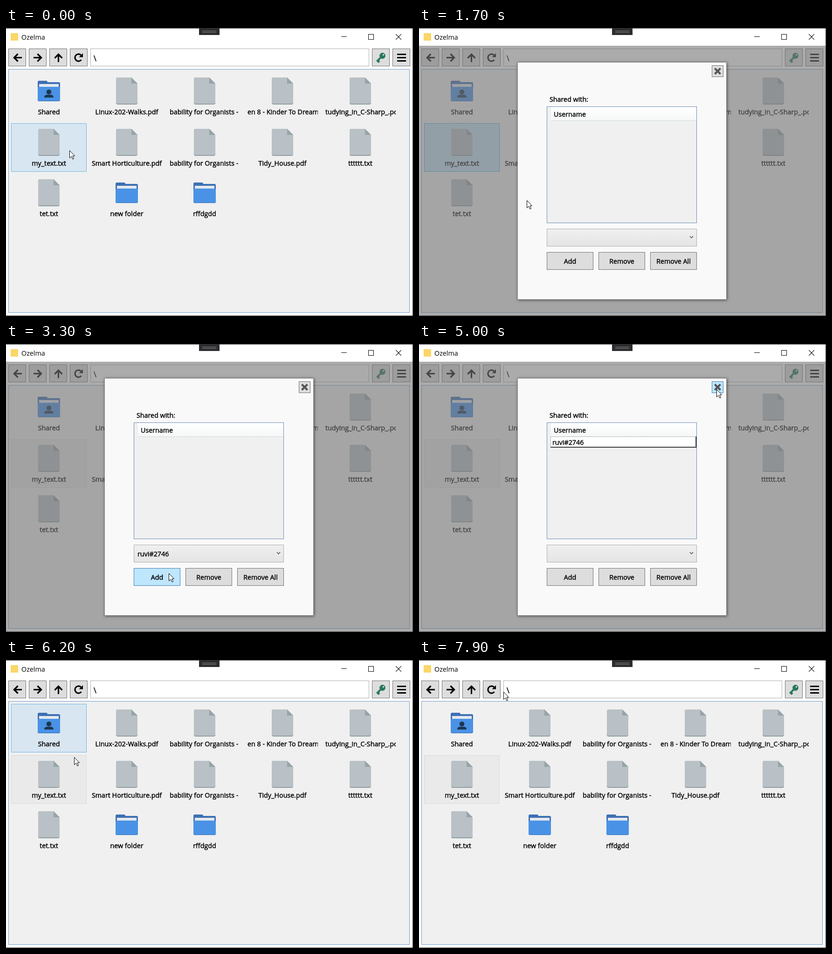
An HTML page with a canvas for the animation above (8000 ms loop, 873x617 px).

```html
<!DOCTYPE html>
<html lang="en">
<head>
<meta charset="utf-8">
<style>
html, body { margin: 0; width: 100%; height: 100%; overflow: hidden; background: #fff; }
canvas { display: block; }
</style>
</head>
<body>
<canvas id="stage" width="873" height="617"></canvas>
<script>
const c = document.getElementById('stage').getContext('2d');
const LOOP = 8000, STEP = 100, HOVER_LAG = 150, TAU = Math.PI * 2;
const MENU_OPEN = 600, DIALOG_OPEN = 1500, DROP_OPEN = 2500, PICKED = 2900, ADDED = 3500, CLOSED = 5300;
const USER = 'ruvi#2746';

// Pointer stops: time, x, y
const STOPS = [[0, 136, 262], [MENU_OPEN, 132, 261], [1200, 212, 351], [DIALOG_OPEN, 212, 353], [2200, 306, 435],
  [2800, 318, 482], [3300, 349, 491], [3700, 349, 491], [5000, 638, 97], [CLOSED, 638, 97],
  [5900, 143, 150], [6200, 146, 208], [7200, 156, 236], [7900, 181, 68]];

const ROWS = [135, 245, 353];
const FILES = [
  ['Shared', 'Linux-202-Walks.pdf', 'bability for Organists - 3', 'en 8 - Kinder To Dreams', 'tudying_in_C-Sharp_.pdf'],
  ['my_text.txt', 'Smart Horticulture.pdf', 'bability for Organists - 3', 'Tidy_House.pdf', 'tttttt.txt'],
  ['tet.txt', 'new folder', 'rffdgdd']];
const FOLDERS = ['Shared', 'new folder', 'rffdgdd'];

function pointerAt(t) {
  const i = Math.max(1, STOPS.findIndex(s => s[0] >= t));
  const [a, b] = [STOPS[i - 1], STOPS[i]];
  const k = Math.max(0, (t - a[0]) / (b[0] - a[0])), ease = k * k * (3 - 2 * k);
  return [a[1] + (b[1] - a[1]) * ease, a[2] + (b[2] - a[2]) * ease];
}

const over = ([px, py], x, y, w, h) => px >= x && px < x + w && py >= y && py < y + h;

function rect(x, y, w, h, fill, border) {
  c.fillStyle = fill;
  c.fillRect(x, y, w, h);
  if (border) {
    c.strokeStyle = border;
    c.lineWidth = 1;
    c.strokeRect(x + .5, y + .5, w - 1, h - 1);
  }
}

// "heavy" thickens regular glyphs to a medium weight.
function text(s, x, y, { align = 'left', heavy = true, size = 14.3 } = {}) {
  c.font = `${size}px "Open Sans", "Noto Sans", sans-serif`;
  c.textAlign = align;
  c.fillStyle = c.strokeStyle = '#000';
  c.fillText(s, x, y);
  c.lineWidth = .45;
  if (heavy) c.strokeText(s, x, y);
}

function trace(points) {
  c.beginPath();
  points.forEach(p => c.lineTo(...p));
}

function line(points, width, color = '#000') {
  trace(points);
  c.lineWidth = width;
  c.strokeStyle = color;
  c.stroke();
}

function shape(points, fill = '#000') {
  trace(points);
  c.fillStyle = fill;
  c.fill();
}

function dot(x, y, r, fill = '#000') {
  c.beginPath();
  c.arc(x, y, r, 0, TAU);
  c.fillStyle = fill;
  c.fill();
}

function arc(x, y, r, from, to, width) {
  c.beginPath();
  c.arc(x, y, r, from, to);
  c.lineWidth = width;
  c.strokeStyle = '#000';
  c.stroke();
}

function round(x, y, w, h, r, fill) {
  c.beginPath();
  c.roundRect(x, y, w, h, r);
  c.fillStyle = fill;
  c.fill();
}

function at(x, y, angle, draw) {
  c.save();
  c.translate(x, y);
  c.rotate(angle);
  draw();
  c.restore();
}

function clipTo(build, draw) {
  c.save();
  build();
  c.clip();
  draw();
  c.restore();
}

function cross(x, y, r, width, color) {
  for (const s of [-1, 1]) line([[x - r, y - s * r], [x + r, y + s * r]], width, color);
}

function gradient(y, h, top, bottom) {
  const g = c.createLinearGradient(0, y, 0, y + h);
  g.addColorStop(0, top);
  g.addColorStop(1, bottom);
  return g;
}

function panel(x, y, w, h, fill, border, blur, offset) {
  c.save();
  c.shadowColor = 'rgba(0,0,0,.55)';
  c.shadowBlur = blur;
  c.shadowOffsetX = c.shadowOffsetY = offset;
  rect(x, y, w, h, fill);
  c.restore();
  rect(x, y, w, h, fill, border);
}

function titleBar() {
  rect(0, 0, 873, 38, '#fff');
  rect(0, 0, 873, 1, '#1d1d1d');
  rect(872, 0, 1, 617, '#333');
  rect(0, 616, 873, 1, '#333');
  rect(10, 11, 16, 16, '#fbd668');
  text('Ozelma', 33, 25, { heavy: false });
  rect(414, 0, 44, 15, '#2d2d30');
  for (const y of [6, 9]) rect(421, y, 30, 1, '#858585');
  rect(719, 18, 12, 1, '#000');
  rect(777, 13, 12, 12, '#fff', '#000');
  cross(842, 19, 5.8, 1.1);
}

function toolbar() {
  for (let i = 0; i < 6; i++) rect(i < 4 ? 5 + 44 * i : 609 + 44 * i, 44, 38, 38, '#ddd', '#707070');
  rect(181, 44, 598, 38, '#fff', '#abadb3');
  text('\\', 188, 71, { size: 16 });
  [0, Math.PI, Math.PI / 2].forEach((angle, i) => at(24.5 + 44 * i, 63.5, angle, () => {
    line([[-7, 0], [9.5, 0]], 3.2);
    line([[1, -8], [-7, 0], [1, 8]], 3.4);
  }));
  arc(155.5, 63.5, 7.6, .65, 5.5, 3.2);
  shape([[165, 54], [165, 62.5], [156.5, 62.5]]);
  at(807.5, 59.5, -Math.PI / 4, () => {
    rect(-17, -2, 14, 4, '#27795c');
    rect(-17, 0, 5, 5, '#27795c');
    dot(0, 0, 6.4, '#27795c');
    dot(2.8, 0, 1.7, '#ddd');
  });
  for (let i = 0; i < 3; i++) rect(839, 55 + 7 * i, 19, 3, '#000');
}

function fileIcon(x, y) {
  const [l, t, r, b, fold] = [x - 23, y - 29, x + 23, y + 29, 13];
  clipTo(() => trace([[l, t], [r - fold, t], [r, t + fold], [r, b], [l, b]]), () => {
    round(l, t, 46, 58, 4, '#919fa2');
    round(l, t, 46, 56, 4, '#b9c1c6');
    shape([[r - fold, t], [r, t + fold], [r - fold, t + fold]], '#96a5a7');
  });
}

function folderIcon(x, y, shared) {
  round(x - 24, y - 22, 21, 12, 3, '#3e70b4');
  round(x - 24, y - 19, 48, 38, 3, '#3e70b4');
  rect(x - 21, y - 15, 42, 8, '#e3e8ee');
  round(x - 24, y - 9, 48, 31, 3, '#3b74bc');
  round(x - 24, y - 9, 48, 30, 3, '#4a92e6');
  if (!shared) return;
  dot(x, y + 2, 5.3, '#1c3850');
  round(x - 10, y + 8, 20, 6, [6, 6, 1, 1], '#1c3850');
}

function fileList(t, hover) {
  rect(5, 88, 861, 522, '#f0f0f0', '#6c9bcb');
  const modal = t >= DIALOG_OPEN && t < CLOSED, blocked = t >= MENU_OPEN && t < CLOSED;
  FILES.forEach((names, r) => names.forEach((name, i) => {
    const x = 92 + 167 * i, y = ROWS[r], box = [x - 81, y - 41, 162, 104];
    const selected = name === 'my_text.txt' && t >= MENU_OPEN;
    if (selected && modal && t < DROP_OPEN) rect(...box, '#c5e2f3', '#4ca8e4');
    else if (selected) rect(...box, '#e9eae9', '#dadada');
    else if (!blocked && over(hover, ...box)) rect(...box, '#d8e6f1', '#70b6e2');
    if (FOLDERS.includes(name)) folderIcon(x, y, name === 'Shared');
    else fileIcon(x, y);
    clipTo(() => { c.beginPath(); c.rect(x - 75, y + 32, 151, 28); }, () => {
      const clipped = /^(bab|en 8|tud)/.test(name);
      text(name, clipped ? x - 75 : x, y + 50, { align: clipped ? 'left' : 'center' });
    });
  }));
}

const MENU = {
  Open() {
    shape([[-10, -3], [0, -10], [10, -3], [10, 9], [-10, 9]]);
    rect(-6, -5, 12, 7, '#f2f2f2');
    for (const y of [-3, 0]) rect(-4, y, 8, 1.5, '#000');
    line([[-9, 1], [0, 6], [9, 1]], 1.5, '#f2f2f2');
  },
  Update() {
    for (const angle of [0, Math.PI]) at(0, 0, angle, () => {
      arc(0, 0, 7.5, 3.4, 5.7, 3);
      shape([[10, -10], [10, -2], [2, -2]]);
    });
  },
  Export() {
    shape([[-10, -9], [0, -9], [5, -4], [5, 9], [-10, 9]]);
    line([[0, -9], [0, -4], [5, -4]], 1, '#f2f2f2');
    line([[-3, 2], [5, 2]], 2, '#f2f2f2');
    line([[5, 2], [9, 2]], 2.4);
    shape([[6, -2.5], [10.5, 2], [6, 6.5]]);
  },
  Share() {
    const nodes = [[6, -6], [-5, 0], [6, 6]];
    line(nodes, 2.4);
    nodes.forEach(p => dot(...p, 3.8));
  },
  Delete() {
    round(-10, -9, 20, 18, 2, '#cd7468');
    cross(0, 0, 4, 3, '#fff');
  }
};

function contextMenu(tip) {
  panel(132, 260, 165, 147, '#f3f3f3', '#999', 4, 3);
  rect(170, 263, 1, 141, '#dcdcdc');
  Object.entries(MENU).forEach(([label, icon], i) => {
    const y = 263 + 28 * i;
    if (over(tip, 136, y, 156, 28)) rect(136, y, 156, 28, '#bfddee', '#3b9cda');
    at(150, y + 14.5, 0, icon);
    text(label, 180, y + 20, { heavy: false });
  });
}

function button(tip, label, x, y, w, h) {
  const hot = over(tip, x, y, w, h);
  rect(x, y, w, h, hot ? '#bee6fd' : '#ddd', hot ? '#3c7fb1' : '#707070');
  text(label, x + w / 2, y + 25, { align: 'center' });
}

function dialog(t, tip) {
  rect(0, 38, 872, 578, 'rgba(115,115,115,.6)');
  panel(211, 73, 449, 509, '#faf9fa', '#8d8a8c', 6, 1);
  button(tip, '', 628, 80, 25, 25);
  cross(640.5, 92.5, 6, 4.2, '#555');
  text('Shared with:', 280, 158);
  rect(274, 168, 322, 250, '#f0f0f0', '#688caf');
  rect(283, 169, 312, 29, gradient(169, 29, '#fff', '#f5f7f8'));
  rect(283, 198, 312, 1, '#d0dbe0');
  text('Username', 289, 190);
  if (t >= ADDED) {
    rect(282, 198, 313, 24, '#000');
    rect(282, 198, 311.5, 22.5, '#fff', '#b5b5b5');
    text(USER, 286, 216);
  }

  const dropped = t >= DROP_OPEN && t < PICKED;
  const hot = dropped || over(tip, 274, 430, 322, 38);
  rect(274, 430, 322, 38, gradient(430, 38, ...(hot ? ['#ebf4fc', '#dcebfb'] : ['#f0f0f0', '#e4e4e4'])),
    hot ? '#7eb4e2' : '#acacac');
  line([[581, 446], [584.5, 449.5], [588, 446]], 1.6, hot ? '#000' : '#555');
  if (t >= PICKED && t < ADDED) text(USER, 282, 455);
  ['Add', 'Remove', 'Remove All'].forEach((label, i) => button(tip, label, 274 + 111 * i, 480, 100, 38));
  if (dropped) {
    rect(274, 468, 322, 28, '#fff', '#7a7a7a');
    if (over(tip, 275, 468, 320, 28)) rect(275, 469, 320, 26, '#d5e9f8', '#78bce8');
    text(USER, 282, 487);
  }
}

function cursor(x, y) {
  at(Math.round(x) + .5, Math.round(y) + .5, 0, () => {
    shape([[0, 0], [0, 16], [4, 12.5], [6.5, 18.5], [9, 17.5], [6.5, 11.5], [11, 11.5]], '#fff');
    c.closePath();
    c.lineWidth = 1;
    c.strokeStyle = '#000';
    c.stroke();
  });
}

function frame(now) {
  const t = Math.floor(now % LOOP / STEP) * STEP, tip = pointerAt(t);
  rect(0, 0, 873, 617, '#fff');
  toolbar();
  fileList(t, pointerAt(Math.max(0, t - HOVER_LAG)));
  if (t >= MENU_OPEN && t < DIALOG_OPEN) contextMenu(tip);
  if (t >= DIALOG_OPEN && t < CLOSED) dialog(t, tip);
  titleBar();
  cursor(...tip);
  requestAnimationFrame(frame);
}
requestAnimationFrame(frame);
</script>
</body>
</html>
```
